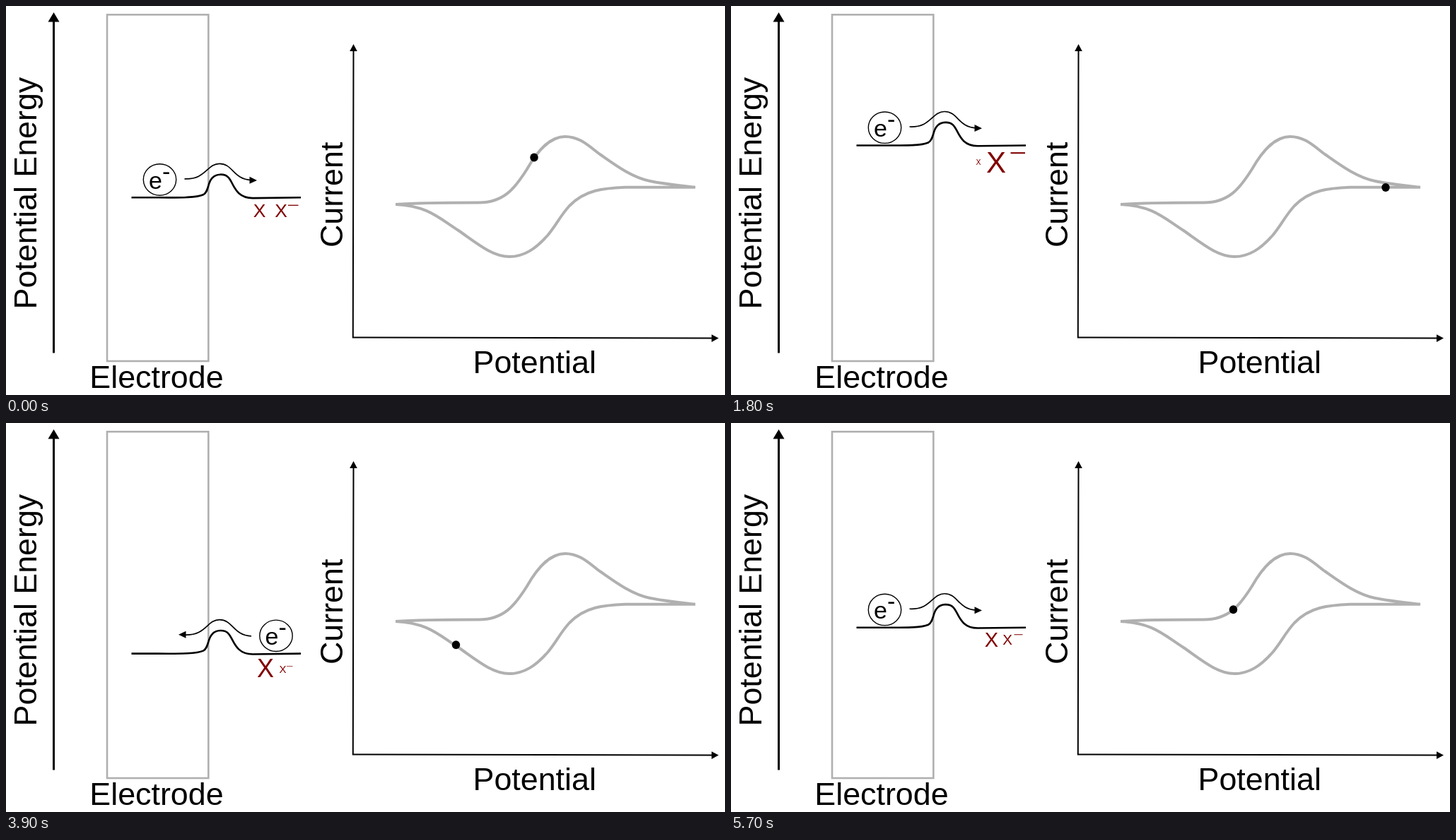
An HTML page for the animation above (6 s loop, 1017 by 551 pixels).

```html
<!DOCTYPE html>
<html lang="en">
<head>
<meta charset="utf-8">
<title>Cyclic voltammetry</title>
<style>
  html, body { margin: 0; width: 100%; height: 100%; overflow: hidden; background: #fff; }
  svg { display: block; }
  text { font-family: "Liberation Sans", Arial, sans-serif; font-size: 44.8px; }
  .line { fill: none; stroke: #000; }
  .gray { fill: none; stroke: #b0b0b0; }
  .red text { fill: #800000; text-anchor: middle; }
  .red line { stroke: #800000; }
  #electron text { font-size: 34px; }
</style>
</head>
<body>
<svg width="1017" height="551" viewBox="0 0 1017 551">
  <rect class="gray" x="143" y="12.3" width="143.3" height="490.7" stroke-width="2.6"/>
  <path class="line" d="M67.5 491.5V20" stroke-width="3"/>
  <path d="M67.5 9l8 13.5h-16z"/>
  <path class="line" d="M491.5 62L490.8 469.5L1000 470.6" stroke-width="2"/>
  <path d="M491.5 54l5.3 10h-10.6zM1008 470.6l-10 5.3v-10.6z"/>
  <text x="118.3" y="541.3">Electrode</text>
  <text x="660.5" y="519.7">Potential</text>
  <text transform="translate(43.3 429.5) rotate(-90)">Potential Energy</text>
  <text transform="translate(475.8 342) rotate(-90)">Current</text>

  <path class="gray" stroke-width="4" stroke-linejoin="bevel" d="M551 281C585 278.5 620 278.5 665 278.5
    C704 280 720 258 737 231C753 203 770 185 791 185C812 185 825 199 840 210
    C860 224 885 243 911 248C930 252 952 254 975 256.7H876C846 258 819 260 797 283
    C784 297 778 311 766 325C749 344 733 355 712 355C688 355 666 336 640 318
    C612 300 596 283 551 281"/>
  <ellipse id="dot" rx="5.7" ry="6"/>

  <g id="level">
    <path class="line" stroke-width="2.6" d="M177.5 0H215C250 .3 270 0 279 -4C287 -8 285 -22 292 -28
      C297 -34 309 -34 314 -29C322 -22 323 .8 349 .8L417 0"/>
    <path class="line" stroke-width="1.7" d="M252.5 -26.5C283 -25 284 -48 302 -48C321 -48 321 -26 347 -24.7"/>
    <path id="headRight" d="M355 -24.3l-10.5 4.8v-10z"/>
    <path id="headLeft" d="M244 -27l10.5 -5v10z"/>
    <g id="electron">
      <ellipse class="line" cx="217.5" cy="-25.3" rx="23.2" ry="22.2" stroke-width="1.4"/>
      <text x="202" y="-12.3">e</text>
      <text x="221" y="-25.5">-</text>
    </g>
    <g class="red">
      <text id="neutral">X</text>
      <text id="anion">X</text>
      <line id="charge"/>
    </g>
  </g>
</svg>
<script>
const LOOP = 6000, STEP = 300;
const $ = id => document.getElementById(id);
const set = (id, attrs) => {
  for (const name in attrs) $(id).setAttribute(name, attrs[name]);
};

// Dot position at each step
const dots = [
  [747, 214.5], [794, 187], [840, 208], [886, 240], [926, 249.5],
  [975, 257], [926, 257], [886, 257], [839.5, 259], [794, 283],
  [748, 343], [710.5, 355], [673.5, 340], [636.5, 314.3], [599.5, 289.5],
  [563, 280], [599.5, 279], [636.5, 278.5], [673.5, 278], [710.5, 264.3]
];

// energy | X: centre, size, baseline | X-: centre, size, baseline | charge: left, right, y
const species = [
  [-5, 368, 44.5, 39.5, 394, 7, 24, 397, 401, 21],
  [-4, 368, 40, 36, 393, 10, 25, 397, 403, 20],
  [-3, 367, 36, 33.5, 391.5, 15, 27, 397, 405.5, 18],
  [-1, 368.5, 29, 27, 391, 20.5, 24, 400.5, 412.5, 10],
  [0, 358.5, 26.5, 28, 389, 26.5, 28, 399, 413.5, 11],
  [2, 358, 17, 28, 382, 33.5, 33, 398, 415, 11],
  [4, 350, 10.5, 27.3, 375, 42, 38.5, 395.5, 416, 10.7],
  [5, 347, 7, 27, 371.5, 46, 41.5, 394, 417, 10.5]
];

function speciesAt(energy) {
  const i = Math.max(1, species.findIndex(row => row[0] >= energy));
  const a = species[i - 1], b = species[i];
  const f = (energy - a[0]) / (b[0] - a[0]);
  return a.map((v, n) => v + (b[n] - v) * f);
}

function draw(step) {
  const energy = step <= 5 ? step : step <= 15 ? 10 - step : step - 20;
  const reverse = step >= 9 && step <= 18;
  const [, x, size, y, ax, aSize, ay, x1, x2, cy] = speciesAt(energy);

  set("dot", { cx: dots[step][0], cy: dots[step][1] });
  set("level", { transform: `translate(0 ${271.3 - 18.45 * energy})` });
  set("electron", { transform: `translate(${reverse ? 164.5 : 0} 0)` });
  set("headLeft", { visibility: reverse ? "visible" : "hidden" });
  set("headRight", { visibility: reverse ? "hidden" : "visible" });
  set("neutral", { x, y, style: `font-size:${size}px` });
  set("anion", { x: ax, y: ay, style: `font-size:${aSize}px` });
  set("charge", { x1, x2, y1: cy, y2: cy, "stroke-width": aSize * 0.05 });
}

const start = performance.now();
function tick() {
  draw(Math.floor((performance.now() - start) % LOOP / STEP));
  requestAnimationFrame(tick);
}
tick();
</script>
</body>
</html>
```
